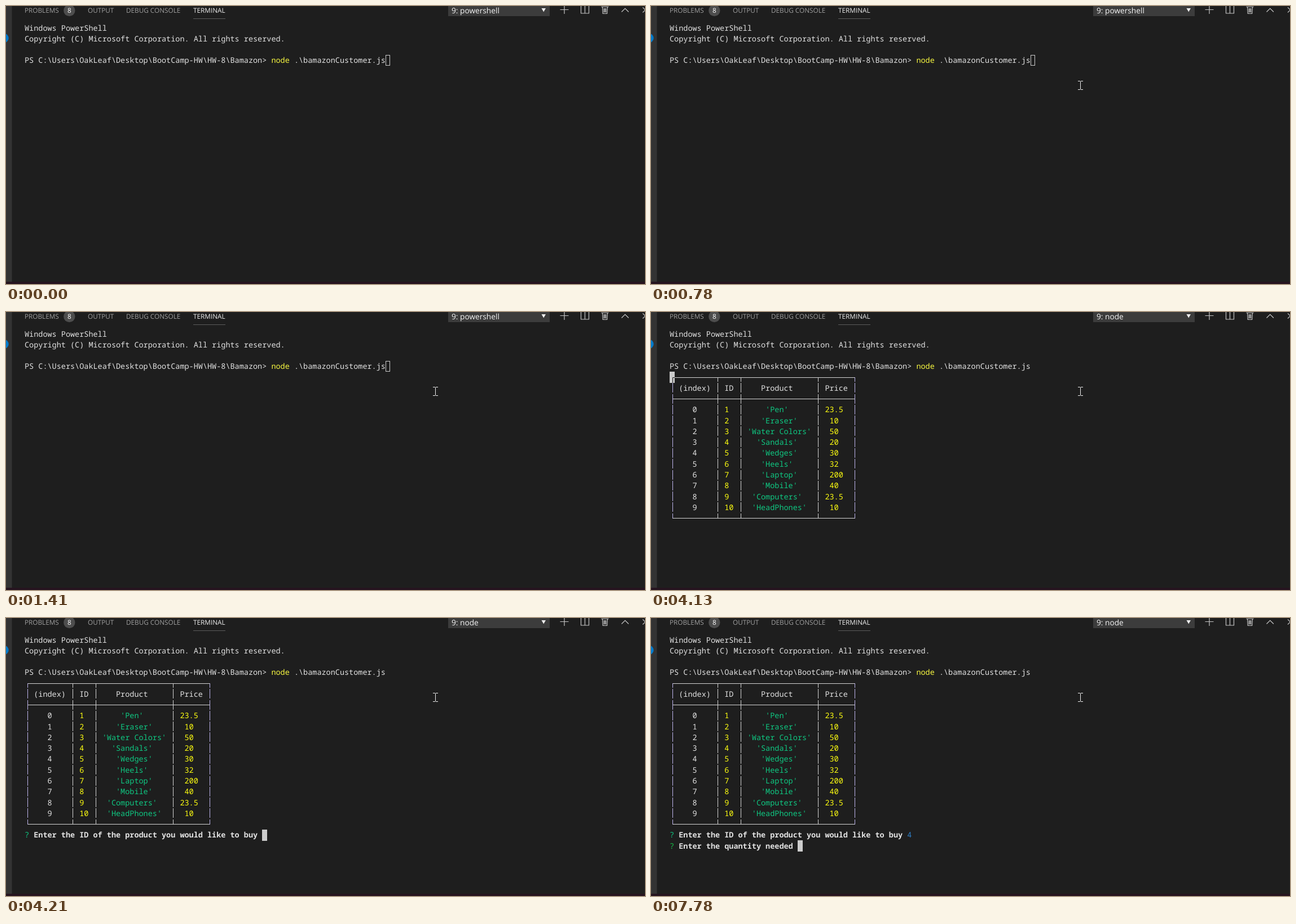
These frames come from a looping animation (1133x494 px, 8000 ms). An HTML page:

```html
<!DOCTYPE html>
<html lang="en">
<head>
<meta charset="utf-8">
<title>Terminal</title>
<style>
html, body { margin: 0; width: 100%; height: 100%; overflow: hidden; background: #1e1e1e; }
svg { display: block; }
text { text-rendering: geometricPrecision; white-space: pre; }
.mono { font: 13.5px "Noto Sans Mono", "DejaVu Sans Mono", monospace; }
.bold { font-weight: 700; }
.ui { font: 11.75px "Open Sans", "Noto Sans", sans-serif; }
.icon { fill: none; stroke: #c5c5c5; stroke-width: 1.2; }
</style>
</head>
<body>
<svg id="stage" width="1133" height="494" viewBox="0 0 1133 494"></svg>
<script>
const LOOP = 8000, LEFT = 33, TOP = 29, CELL = 8.1, ROW = 19.27;
const FG = '#e2e2e2', GREEN = '#0fc882', YELLOW = '#ffff10';
const stage = document.getElementById('stage');

const colX = c => LEFT + c * CELL;
const rowY = r => TOP + r * ROW;
const rect = (x, y, w, h, fill) => `<rect x="${x}" y="${y}" width="${w}" height="${h}" fill="${fill}"/>`;
const put = (c, r, s, fill = FG, cls = '') =>
  `<text class="mono ${cls}" x="${colX(c).toFixed(2)}" y="${Math.round(rowY(r) + 14.5)}" fill="${fill}">${s}</text>`;
const label = (x, s, fill, more = '', y = 12) => `<text class="ui" x="${x}" y="${y}" fill="${fill}" ${more}>${s}</text>`;
const block = (c, r) => rect(Math.round(colX(c)), Math.round(rowY(r)), 9, 20, '#cccccc');
const during = (from, to, body) => `<g data-from="${from}" data-to="${to}">${body}</g>`;

function header() {
  const title = s => label(790, s, '#f5f5f5', 'style="font-size:13.7px"', 13);
  return label(33, 'PROBLEMS', '#a0a0a0') +
    '<circle cx="112.3" cy="8" r="10.2" fill="#4d4d4d"/>' +
    label(112.3, '8', '#fff', 'text-anchor="middle"') +
    label(145, 'OUTPUT', '#a0a0a0') +
    label(213, 'DEBUG CONSOLE', '#a0a0a0') +
    label(332, 'TERMINAL', '#f0f0f0') +
    rect(332, 22, 57, 1, '#5c5c5c') +
    rect(784, 0, 180, 18, '#3c3c3c') +
    during(0, 2420, title('9: powershell')) +
    during(2420, LOOP, title('9: node')) +
    '<path d="M949.5 4h7.5l-3.75 6.5z" fill="#f0f0f0"/>' +
    `<path class="icon" d="M982.5 6.5h15M990 -1v15M1019.5 -1h14v14h-14zM1026.5 -1v14
      M1055.5 1.5h13M1057.5 2l.8 11.5h7.4l.8-11.5M1060.3 4v7.5M1062 4v7.5M1063.7 4v7.5
      M1091.5 10.5l6.2-6.2 6.2 6.2M1129 2.5l9 9M1129 11.5l9-9"/>`;
}

function table() {
  const widths = [9, 4, 16, 7];
  const starts = [1, 11, 16, 33];
  const stock = [['Pen', 23.5], ['Eraser', 10], ['Water Colors', 50], ['Sandals', 20], ['Wedges', 30],
    ['Heels', 32], ['Laptop', 200], ['Mobile', 40], ['Computers', 23.5], ['HeadPhones', 10]];
  const colors = [FG, YELLOW, GREEN, YELLOW];
  const line = (cells, r, fills) => cells.map((v, i) => {
    const s = String(v);
    return put(starts[i] + Math.floor((widths[i] - s.length) / 2), r, s, fills[i]);
  }).join('');

  let out = line(['(index)', 'ID', 'Product', 'Price'], 5, [FG, FG, FG, FG]);
  stock.forEach(([name, price], i) => out += line([i, i + 1, `'${name}'`, price], 7 + i, colors));

  const mid = r => Math.round(rowY(r) + 9.6);
  for (const r of [4, 6, 17]) out += rect(38, mid(r), 324, 1, '#d4d4d4');
  [38, 118, 159, 296, 361].forEach((x, i) => {
    const fill = i % 4 ? '#d4d4d4' : '#bdb4ec';
    for (let r = 4; r <= 17; r++) {
      const y = r === 4 ? mid(r) : Math.round(rowY(r) + 1);
      const end = r === 17 ? mid(r) + 1 : Math.round(rowY(r) + 18);
      out += rect(x, y, 1, end - y, fill);
    }
  });
  return out;
}

function session() {
  const ask = 'Enter the ID of the product you would like to buy';
  return put(0, 0, 'Windows PowerShell') +
    put(0, 1, 'Copyright (C) Microsoft Corporation. All rights reserved.') +
    put(0, 3, 'PS C:\\Users\\OakLeaf\\Desktop\\BootCamp-HW\\HW-8\\Bamazon&gt;') +
    put(54, 3, 'node', '#f8f840') +
    put(59, 3, '.\\bamazonCustomer.js') +
    during(0, 1560, '<rect x="673.5" y="87.5" width="7" height="18" fill="none" stroke="#cccccc"/>') +
    during(4130, LOOP, table()) +
    during(2420, 4210, block(0, 4)) +
    during(4130, 4210, '<path d="M38.5 126v-9.5h3.5" fill="none" stroke="#1e1e1e"/>') +
    during(4210, LOOP, put(0, 18, '?', GREEN) + put(2, 18, ask, FG, 'bold')) +
    during(4210, 6540, block(52, 18)) +
    during(6540, 7780, put(52, 18, '4') + block(53, 18)) +
    during(7780, LOOP, put(52, 18, '4', '#2f7fc8') + put(0, 19, '?', '#16c048') +
      put(2, 19, 'Enter the quantity needed', FG, 'bold') + block(28, 19));
}

const beam = '<path d="M-5 -7.5h4M0 -7.5h4M-5 7.5h4M0 7.5h4M-.5 -7v14" fill="none" stroke="#f0f0f0"/>';
const ring = '<circle cx="-1.5" cy="-1" r="9" fill="none" stroke="#2f9fdc" stroke-width="4"/>';

stage.innerHTML = rect(0, 0, 1133, 494, '#1e1e1e') + rect(0, 0, 10.5, 494, '#333333') +
  '<circle cx="-3.6" cy="57" r="8.3" fill="#007acc"/>' + rect(0, 490, 1133, 4, '#26141f') +
  header() + session() +
  `<g id="pointer">${during(140, 1320, beam)}${during(1320, 1410, ring)}${during(1410, LOOP, beam)}</g>`;

const timed = [...stage.querySelectorAll('[data-from]')];
const pointer = document.getElementById('pointer');
const begin = performance.now();

function draw(now) {
  const t = Math.max(0, now - begin) % LOOP;
  for (const g of timed) {
    const on = t >= +g.dataset.from && t < +g.dataset.to;
    g.style.display = on ? '' : 'none';
  }
  // The pointer glides in as ten sampled positions, slowing down.
  const step = Math.max(0, Math.min(9, Math.floor((t - 140) / 71.1)));
  const rest = (1 - step / 9) ** 2;
  pointer.setAttribute('transform', `translate(${Math.round(762 + 174 * rest)} ${Math.round(141 + 235 * rest)})`);
  requestAnimationFrame(draw);
}
draw(begin);
</script>
</body>
</html>
```
